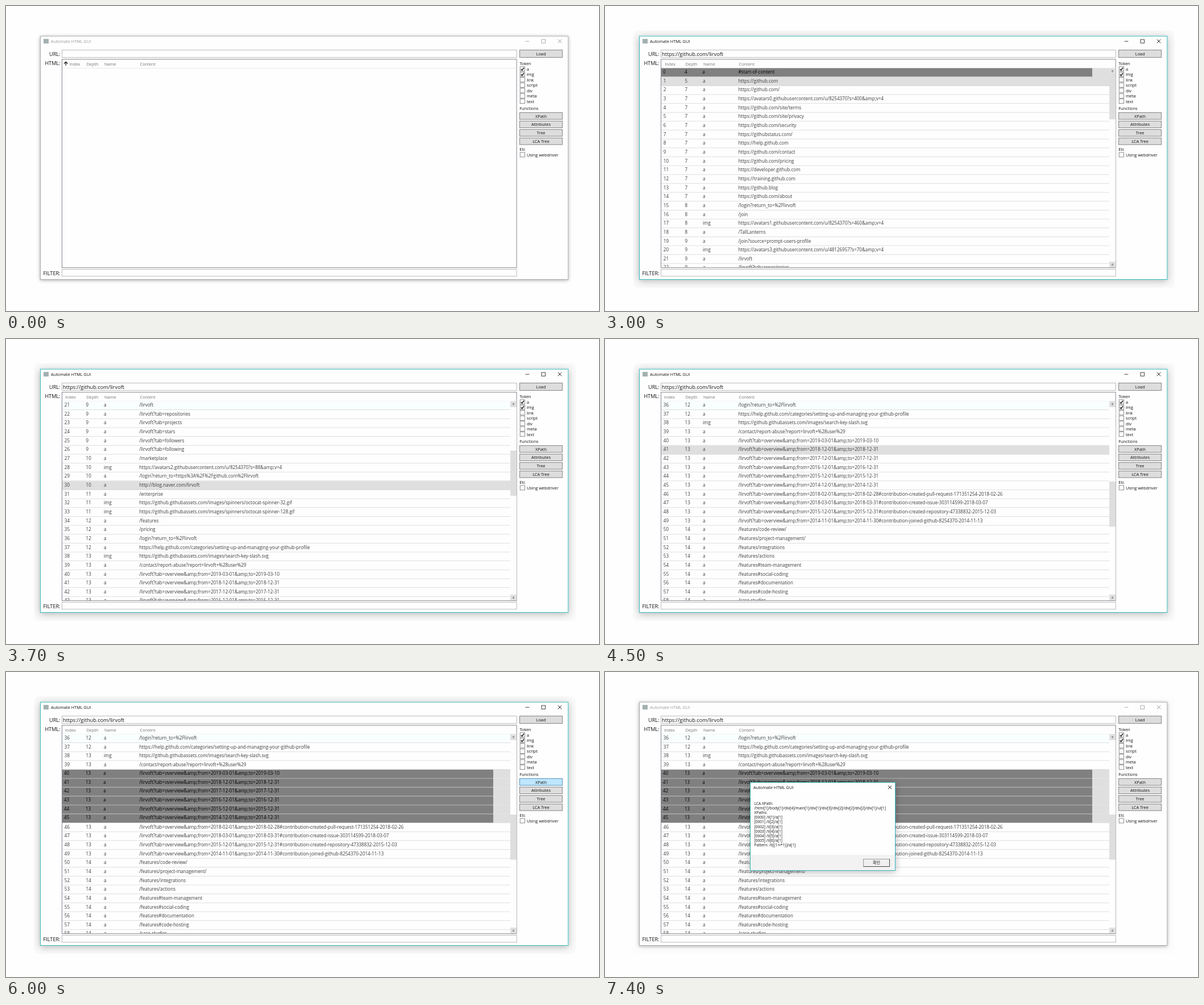
Write an HTML page with a canvas that moves like this. It is 1043 by 537 pixels and loops after 8000 ms.

```html
<!DOCTYPE html>
<html lang="en">
<head>
<meta charset="utf-8">
<title>HTML list tool</title>
<style>
html, body { margin: 0; width: 100%; height: 100%; overflow: hidden; background: #fefefe; }
canvas { display: block; }
</style>
</head>
<body>
<canvas id="stage" width="1043" height="537"></canvas>
<script>
const ctx = document.getElementById('stage').getContext('2d');
const LOOP = 8000;
const FAMILY = '"Open Sans", "Noto Sans CJK KR", "Noto Sans CJK", sans-serif';
const USER = 'lirvoft', USER_ID = '8254370';
const SITE = 'https://github.com';
const ROW_TOP = 109.4, ROW_H = 15.65, ROW_FONT = 8.04, UI_FONT = 7.35;
const BLUE = '#3c7fb1', TEAL = '#35b8bd';

const range = (from, to) =>
  `/${USER}?tab=overview&amp;from=${from}&amp;to=${to}`;
const avatar = (host, id, size) =>
  `https://avatars${host}.githubusercontent.com/u/${id}?s=${size}&amp;v=4`;
const asset = name => `https://github.githubassets.com/images/${name}`;
const tab = name => `/${USER}?tab=${name}`;

const contents = [
  '#start-of-content', SITE, SITE + '/', avatar(0, USER_ID, 400),
  ...['terms', 'privacy'].map(s => `${SITE}/site/${s}`),
  SITE + '/security', 'https://githubstatus.com/', 'https://help.github.com',
  SITE + '/contact', SITE + '/pricing', 'https://developer.github.com',
  'https://training.github.com', 'https://github.blog', SITE + '/about',
  `/login?return_to=%2F${USER}`, '/join', avatar(1, USER_ID, 460),
  '/TallLanterns', '/join?source=prompt-users-profile',
  avatar(3, '48126957', 70), '/' + USER,
  ...['repositories', 'projects', 'stars', 'followers', 'following'].map(tab),
  '/marketplace', avatar(2, USER_ID, 88),
  `/login?return_to=https%3A%2F%2Fgithub.com%2F${USER}`,
  `http://blog.naver.com/${USER}`, '/enterprise',
  asset('spinners/octocat-spinner-32.gif'), asset('spinners/octocat-spinner-128.gif'),
  '/features', '/pricing', `/login?return_to=%2F${USER}`,
  'https://help.github.com/categories/setting-up-and-managing-your-github-profile',
  asset('search-key-slash.svg'), `/contact/report-abuse?report=${USER}+%28user%29`,
  range('2019-03-01', '2019-03-10'),
  ...[2018, 2017, 2016, 2015, 2014].map(y => range(y + '-12-01', y + '-12-31')),
  range('2018-02-01', '2018-02-28') + '#contribution-created-pull-request-171351254-2018-02-26',
  range('2018-03-01', '2018-03-31') + '#contribution-created-issue-303114599-2018-03-07',
  range('2015-12-01', '2015-12-31') + '#contribution-created-repository-47338832-2015-12-03',
  range('2014-11-01', '2014-11-30') + `#contribution-joined-github-${USER_ID}-2014-11-13`,
  ...['/code-review/', '/project-management/', '/integrations', '/actions',
    '#team-management', '#social-coding', '#documentation', '#code-hosting'].map(s => '/features' + s),
  '/case-studies'
];
const images = [17, 20, 28, 32, 33, 38];
// Each depth applies from the given row onward.
const depths = [[50, 14], [38, 13], [34, 12], [31, 11], [27, 10], [19, 9], [15, 8], [2, 7], [1, 5], [0, 4]];
const rows = contents.map((content, i) => ({
  content,
  depth: depths.find(([from]) => i >= from)[1],
  name: images.includes(i) ? 'img' : 'a'
}));

function text(str, x, y, size, color = '#111', align = 'left') {
  ctx.font = `${size}px ${FAMILY}`;
  ctx.fillStyle = color;
  ctx.textAlign = align;
  ctx.fillText(str, x, y + size * 0.36);
}

function fill(x, y, w, h, color) {
  ctx.fillStyle = color;
  ctx.fillRect(x, y, w, h);
}

function box(x, y, w, h, color, border, line = 0.8) {
  fill(x, y, w, h, color);
  ctx.strokeStyle = border;
  ctx.lineWidth = line;
  ctx.strokeRect(x + line / 2, y + line / 2, w - line, h - line);
}

function path(points, color, width = 1) {
  ctx.beginPath();
  points.forEach(([x, y]) => ctx.lineTo(x, y));
  ctx.strokeStyle = color;
  ctx.lineWidth = width;
  ctx.stroke();
}

function cross(x, y, r, color) {
  path([[x - r, y - r], [x + r, y + r]], color, 0.9);
  path([[x - r, y + r], [x + r, y - r]], color, 0.9);
}

function arrow(x, y, dir, color, r, width) {
  path([[x, y + r * dir], [x, y - r * dir]], color, width);
  path([[x - r, y], [x, y - r * dir], [x + r, y]], color, width);
}

function shadowed(x, y, w, h, blur, alpha, offset) {
  ctx.save();
  ctx.shadowColor = `rgba(0,0,0,${alpha})`;
  ctx.shadowBlur = blur;
  ctx.shadowOffsetY = offset;
  fill(x, y, w, h, '#fefefe');
  ctx.restore();
}

function button(label, y, h, bg = '#ddd', border = '#707070') {
  box(903, y, 76, h, bg, border);
  text(label, 941, y + h / 2 + 0.3, UI_FONT, '#111', 'center');
}

function checkbox(label, y, checked) {
  box(903.8, y - 4.3, 9, 8.8, '#fff', '#707070');
  if (checked) path([[905.8, y + 0.4], [907.6, y + 2.4], [911, y - 2.2]], '#111', 1.4);
  text(label, 916, y + 0.3, UI_FONT);
}

// glow is the faint halo around the frame, absent before first activation.
function drawWindow(active, glow) {
  if (glow) {
    ctx.fillStyle = active ? '#f9f9f9' : '#fcfcfc';
    ctx.beginPath();
    ctx.roundRect(50, 43, 952, 453, 8);
    ctx.fill();
  }
  if (active) shadowed(60, 53, 929, 429, 12, 0.28, 2);
  else shadowed(60, 53, 929, 429, 6, 0.33, 1);
  box(60, 52.6, 929.3, 429.4, '#fefefe', active ? TEAL : '#aaa', 1);
  const ink = active ? '#111' : '#999';
  fill(66, 58, 9, 8, '#a3b1b0');
  text('Automate HTML GUI', 79, 62.3, UI_FONT, ink);
  path([[913.5, 62.2], [920.3, 62.2]], ink, 0.8);
  ctx.strokeRect(942, 59, 6.4, 6.2);
  cross(974, 62, 3.3, ink);
}

function drawPanel(t) {
  const pressed = ['#c4e5f6', '#2c628b'];
  let load = [], xpath = [];
  if (t >= 700 && t < 1100) load = ['#ddd', '#0078d7'];
  if (t >= 1100 && t < 3000) load = pressed;
  if (t >= 5600 && t < 6100) xpath = ['#bee6fd', BLUE];
  if (t >= 5600 && t < 5700) xpath = ['#cde1ed', '#567897'];
  if (t >= 5900 && t < 6000) xpath = pressed;

  button('Load', 77.2, 13.7, ...load);
  text('Token', 903.3, 101.4, UI_FONT);
  ['a', 'img', 'link', 'script', 'div', 'meta', 'text'].forEach((name, i) =>
    checkbox(name, 110.7 + i * 9.48, i < 2));
  text('Functions', 903.3, 180.6, UI_FONT);
  ['XPath', 'Attributes', 'Tree', 'LCA Tree'].forEach((name, i) =>
    button(name, 187.3 + i * 14.85, 12.6, ...(i ? [] : xpath)));
  text('Etc', 903.3, 252.6, UI_FONT);
  checkbox('Using webdriver', 261.8, false);
}

function drawFields(t) {
  const focused = t >= 400 && t < 1100;
  text('URL:', 95.5, 84.6, 9.1, '#111', 'right');
  text('HTML:', 95.5, 100.3, 9.1, '#111', 'right');
  text('FILTER:', 95.5, 470.3, 9.1, '#111', 'right');
  box(98, 77.2, 800.6, 13.7, '#fefefe', focused ? '#569de5' : '#ababab');
  box(98, 463.2, 800.6, 13, '#fefefe', '#ababab');
  if (t >= 900) text(`${SITE}/${USER}`, 100, 84.6, 9.2);
}

function listState(t) {
  const notch = Math.min(7, Math.floor((t - 3000) / 100));
  const top = t < 3900 ? notch * 3 : t < 4000 ? 30 : 36;
  let hover = -1;
  if (t < 3700) hover = Math.round(1 + notch * 8 / 7);
  else if (t < 4400) hover = 9;
  else if (t < 4500) hover = 7;
  else if (t < 4700) hover = 5;
  else if (t < 4800) hover = 4;
  else if (t >= 5000 && t < 5200) hover = 10;
  const picked = t < 4800 ? [0, 0] : t < 4900 ? [40, 40] : [40, 45];
  return { top, hover, picked };
}

function drawRow(row, index, slot, state) {
  const y = ROW_TOP + slot * ROW_H;
  const selected = index >= state.picked[0] && index <= state.picked[1];
  if (selected) {
    fill(99, y, 758, ROW_H, '#808080');
    fill(857, y, 30, ROW_H, '#dfdfdf');
  } else if (slot === state.hover) {
    fill(99, y, 788, ROW_H, '#dfdfdf');
  } else if (slot === 0) {
    fill(99, y, 788, ROW_H, '#f9fefe');
  }
  fill(99, y + ROW_H - 0.8, selected ? 758 : 788, 0.8, selected ? '#d2d2d2' : '#d8d8d8');
  const ink = selected ? '#000' : '#3c3c3c';
  const textY = y + (selected ? 6.3 : 6.9), dx = selected ? -0.7 : 0;
  text(index, 102.8 + dx, textY, ROW_FONT, ink);
  text(row.depth, 140.6 + dx, textY, ROW_FONT, ink);
  text(row.name, 172 + dx, textY, ROW_FONT, ink);
  text(row.content, 234.4, textY, ROW_FONT, ink);
}

function drawScrollbar(top) {
  fill(887, 110, 11, 350, '#fefefe');
  fill(887, 110, 11, 10, '#e0e0e0');
  fill(887, 450, 11, 10, '#e0e0e0');
  fill(887, 120 + top * 3.64, 11, 79.5, '#dedede');
  arrow(892.5, 115, 1, '#777', 2, 0.9);
  arrow(892.5, 455, -1, '#777', 2, 0.9);
}

function drawList(t) {
  const loaded = t >= 3000;
  box(98, 93.2, 800.6, 368, '#fefefe', '#828790', 1);
  if (!loaded) arrow(105.3, 101.5, 1, '#111', 3.2, 1.2);
  text('Index', !loaded ? 111.5 : t < 3100 ? 105.3 : 104, 102, UI_FONT, '#747474');
  text('Depth', 141.5, 102, UI_FONT, '#747474');
  text('Name', 173, 102, UI_FONT, '#747474');
  text('Content', 235.5, 102, UI_FONT, '#747474');
  fill(99, 109, 799, 0.8, '#e3e3e3');
  if (!loaded) return;

  const state = listState(t);
  ctx.save();
  ctx.beginPath();
  ctx.rect(99, 109, 799, 351);
  ctx.clip();
  for (let slot = 0; slot < 23; slot++) {
    const index = state.top + slot;
    if (rows[index]) drawRow(rows[index], index, slot, state);
  }
  drawScrollbar(state.top);
  ctx.restore();
}

const message = [
  'LCA XPath:',
  '/html[1]/body[1]/div[4]/main[1]/div[1]/div[3]/div[2]/div[2]/div[2]/div[1]/ul[1]',
  'XPaths:',
  ...Array.from({ length: 6 }, (_, i) => `[000${i}] /li[${i + 1}]/a[1]`),
  'Pattern: /li[{1+i*1}]/a[1]'
];

function drawDialog(t) {
  // Fades in, then is dragged to the right.
  const alpha = t < 6200 ? 0.4 : t < 6300 ? 0.8 : 1;
  const [x, y] = t < 7300 ? [188, 190] : t < 7400 ? [226, 192] : [255, 194];
  ctx.save();
  ctx.globalAlpha = alpha;
  ctx.translate(x, y);
  shadowed(0, 0, 256, 156, 12, 0.28, 2);
  box(0, 0, 256, 156, '#fefefe', TEAL, 1);
  fill(1, 128, 254, 27, '#f2f2f2');
  text('Automate HTML GUI', 6, 9.5, UI_FONT);
  cross(246, 9, 3, '#111');
  message.forEach((line, i) => text(line, 7.5, 37.5 + i * 8.15, 6.65));
  box(199, 135, 47, 14, '#f0f0f0', '#888');
  path([[199.5, 148.5], [245.5, 148.5], [245.5, 135]], '#444');
  text('확인', 222.5, 141.8, 7.2, '#111', 'center');
  ctx.restore();
}

function draw() {
  const t = performance.now() % LOOP;
  fill(0, 0, 1043, 537, '#fefefe');
  drawWindow(t >= 400 && t < 6100, t >= 400);
  drawFields(t);
  drawList(t);
  drawPanel(t);
  if (t >= 6100) drawDialog(t);
  requestAnimationFrame(draw);
}
draw();
</script>
</body>
</html>
```
